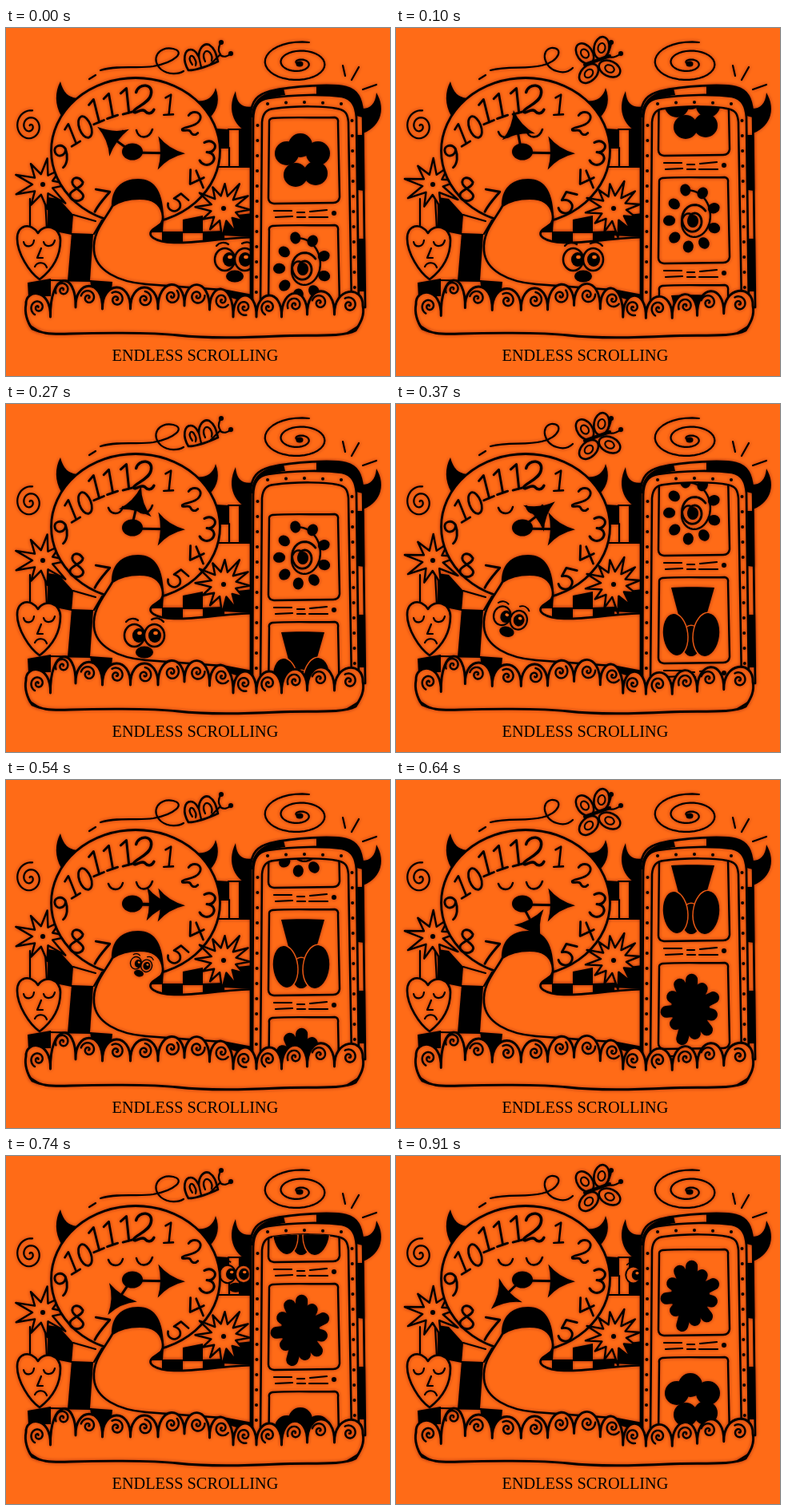
Recreate the animation shown at these times as an HTML page with a canvas. Size 480 by 436 pixels, loop 1.01 s.

```html
<!DOCTYPE html>
<html lang="en">
<head>
<meta charset="utf-8">
<title>Endless Scrolling</title>
<style>
  html, body { margin: 0; width: 100%; height: 100%; overflow: hidden; background: #ff6b17; }
  canvas { display: block; position: absolute; left: 0; top: 0; }
  p {
    position: absolute; left: 132.5px; top: 399px; margin: 0; white-space: nowrap;
    font: 20.3px/23px "Liberation Serif", "Times New Roman", serif; color: #000;
  }
</style>
</head>
<body>
<canvas width="480" height="436"></canvas>
<p>ENDLESS SCROLLING</p>
<script>
const PAPER = '#ff6b17', INK = '#000', TAU = Math.PI * 2;
const c = document.querySelector('canvas').getContext('2d');
c.lineCap = c.lineJoin = 'round';
c.shadowColor = 'rgba(130,30,0,.65)';

// start ms, minute hand degrees, feed scroll, face [x, y, scale, turn]
const LOOP = 1010;
const POSES = [
  { at: 0,   hand: -144, scroll: 0,   face: [286, 290, 1, 0] },
  { at: 100, hand: -101, scroll: 60,  face: [234, 290, 1, 0] },
  { at: 270, hand: -77,  scroll: 109, face: [173, 290, 1, 0] },
  { at: 370, hand: -38,  scroll: 165, face: [143, 268, .85, 15] },
  { at: 540, hand: 1,    scroll: 220, face: [169, 231, .55, 15] },
  { at: 640, hand: 62,   scroll: 288, face: null },
  { at: 740, hand: 124,  scroll: 357, face: [287, 148, .8, 0] },
  { at: 910, hand: 136,  scroll: 400, face: [306, 149, .75, 0] }
];

const asPath = p => typeof p === 'string' ? new Path2D(p) : p;

// ink multiplies, so its soft edge never lightens black
function useInk() {
  c.globalCompositeOperation = 'multiply';
  c.shadowBlur = 4;
  c.fillStyle = c.strokeStyle = INK;
}
function usePaper() {
  c.globalCompositeOperation = 'source-over';
  c.shadowBlur = 0;
  c.fillStyle = c.strokeStyle = PAPER;
}
function line(p, w = 2.7) {
  useInk();
  c.lineWidth = w;
  c.stroke(asPath(p));
}
function fill(p) {
  useInk();
  c.fill(asPath(p));
}
function clear(p, edge = 0) {
  usePaper();
  c.fill(asPath(p));
  if (!edge) return;
  c.lineWidth = edge;
  c.stroke(asPath(p));
}
function shape(p, w) {
  p = asPath(p);
  clear(p);
  line(p, w);
}
function oval(x, y, rx, ry = rx, turn = 0) {
  const p = new Path2D();
  p.ellipse(x, y, rx, ry, turn, 0, TAU);
  return p;
}
const dot = (x, y, rx, ry, turn) => fill(oval(x, y, rx, ry, turn));

function at(x, y, deg, scale, draw) {
  c.save();
  c.translate(x, y);
  c.rotate(deg * Math.PI / 180);
  c.scale(scale, scale);
  draw();
  c.restore();
}

function spiral(x, y, rx, ry, turns, start = 0, w = 2.4) {
  const p = new Path2D();
  for (let i = 0; i <= 80; i++) {
    const k = 1 - i / 84, a = start + i / 80 * turns * TAU;
    p.lineTo(x + rx * k * Math.cos(a), y + ry * k * Math.sin(a));
  }
  line(p, w);
}

function star(x, y, n, outer, inner, turn) {
  const p = new Path2D();
  for (let i = 0; i < n * 2; i++) {
    const r = i % 2 ? inner : outer + 4 * Math.sin(i * 2.3);
    const a = turn + i * Math.PI / n;
    p.lineTo(x + r * Math.cos(a), y + r * Math.sin(a));
  }
  p.closePath();
  shape(p, 2.4);
  dot(x, y, 3);
}

function drawSky(alt) {
  line('M104 64L112 59', 2.2);
  line(alt
    ? 'M118 53C140 47 162 52 182 47C205 42 210 24 194 25C180 28 185 50 201 54C210 57 217 54 221 50'
    : 'M118 53C140 46 165 51 184 48C211 43 225 30 209 26C190 22 180 40 194 52C203 59 216 58 222 54', 2.2);
  spiral(366, 44, 48, 27, -2.3, -1.3, 2.2);
  dot(367, 45, 4.5, 3.5);
  spiral(30, 123, 18, 20, -2.1, -1.4, 2.2);
  line('M421 47L424 60M441 49L432 65M463 71L446 77', 2.2);
  if (alt) {
    for (const [x, y, deg] of [[236, 32, 55], [257, 25, 100], [241, 57, -45], [267, 51, 25]])
      at(x, y, deg, 1, () => { shape(oval(0, 0, 14, 9.5), 2.5); line(oval(0, 0, 6, 4.5), 2); });
    line('M236 46L267 35', 4);
    line('M263 36C266 30 268 26 269 19M265 36C271 38 276 36 281 32', 2.2);
  } else {
    shape('M228 53C220 40 223 27 231 27C237 27 239 33 241 36C241 26 247 18 254 21C262 26 263 35 265 42C253 47 240 53 228 53Z', 2.6);
    line('M241 36L244 49M233 46C226 37 232 30 236 39C238 42 238 44 237 47M249 42C244 32 250 25 255 31C258 35 258 38 257 41', 2.2);
    line('M256 45L268 33C265 29 265 25 268 19M268 34C272 37 277 36 281 32', 2.2);
  }
  dot(269, 18, 3);
  dot(281, 32, 3);
}

function drawChecks() {
  fill('M52 212L66 214 84 234 82 259 52 253Z');
  fill('M82 257L109 258 105 316 77 317Z');
  fill('M105 316L133 318 130 348 110 348Z');
  fill('M27 319L56 314 56 336 28 336Z');
  line('M30 214V250M49 215L51 251M84 234L112 242M55 316L106 317M110 258L120 241', 2.2);
  fill('M262 126L279 127 279 151 265 151Z');
  fill('M291 128L307 128 307 173 291 173Z');
  line('M278 127H307M279 150V174M264 174H307', 2.2);
  fill('M180 240L197 238 196 256 180 256Z');
  fill('M195 255L221 255 221 270 195 270Z');
  fill('M221 240L246 235 246 256 221 256Z');
  fill('M246 255L273 254 273 268 246 268Z');
  fill('M273 236L308 232 308 262 273 260Z');
  line('M196 256H307', 2.2);
  fill('M262 316L308 318 308 346 275 336Z');
}

const GLYPHS = {
  0: 'M0-14C-10-13-10 13 0 14 10 13 9-13 0-14',
  1: 'M-6-9L1-14 1 14M-6 15L7 13',
  2: 'M-8-7C-6-17 9-17 7-6 6 3-8 8-9 12-8 16-2 8 2 11 5 14 9 14 11 9',
  3: 'M-7-11C0-17 9-12 5-5 3-1-1-1-2-1 6-2 10 4 6 10 2 15-5 14-8 10',
  4: 'M-1-13L-9 3 10 3M5-9L4 14',
  5: 'M8-13L-5-12-7-1C2-6 9 0 7 7 5 14-4 15-8 9',
  7: 'M-8-11L8-12C3-2-1 5-3 14',
  8: 'M6-9C0-17-9-13-6-6-3 0 8 2 8 8 7 16-8 16-8 7-7 1 7-3 6-9',
  9: 'M6-7C3-15-8-14-7-6-6 2 5 1 6-7 7 2 4 11-2 14'
};

// digit, x, y, degrees, scale
const DIAL = [
  [1, 151, 91, -6, 1.1], [2, 172, 90, 4, 1.25], [1, 204, 96, 6, .9], [2, 233, 119, 22, 1],
  [3, 253, 157, 12, 1.1], [4, 237, 189, -25, 1], [7, 118, 216, 14, 1.1],
  [8, 89, 202, 5, 1.05], [9, 70, 160, -14, 1.05], [1, 82, 133, -22, .95], [0, 99, 124, -20, 1],
  [1, 112, 104, -14, 1.05], [1, 130, 97, -10, 1.05]
];

const arrow = length => {
  line(`M0 0H${length - 26}`, 3);
  fill(`M${length - 34}-21Q${length - 21}-5 ${length} 0Q${length - 21} 5 ${length - 34} 21Q${length - 28} 0 ${length - 34}-21Z`);
};

function drawClock(hand, alt) {
  fill('M68 67C72 82 78 86 88 88L69 110C61 96 61 80 68 67Z');
  fill('M262 75C259 88 249 93 236 91L254 113C266 102 267 88 262 75Z');
  shape(oval(162, 154, 105.5, 91.5), 2.8);
  for (const [digit, x, y, deg, size] of DIAL)
    at(x, y, deg, size, () => line(GLYPHS[digit]));
  at(214, 219, alt ? 18 : 45, alt ? 1.05 : .95, () => line(GLYPHS[5]));
  line('M128 130C131 139 143 140 146 129M163 128C166 140 179 139 183 127', 2.4);
  at(157, 156, 1, 1, () => arrow(67));
  at(157, 155, hand, 1, () => arrow(53));
  dot(158, 155, 13, 10.5);
}

function drawTongue() {
  fill('M132 224C131 201 145 189 165 189C187 189 197 206 197 242L180 250Z');
  shape('M133 223C123 241 108 256 110 279C112 304 140 318 175 321L270 328 312 336V262C270 263 236 270 210 269C186 268 174 260 184 252C193 246 197 244 196 236C195 224 187 215 173 214C156 213 143 216 133 223Z', 2.6);
}

function drawFace([x, y, size, deg]) {
  at(x, y, deg, size, () => {
    for (const s of [-1, 1]) {
      shape(oval(s * 12.5, 0, 12.5, 14), 2.5);
      dot(s * 10 + 3, 0, 8, 9);
      clear(oval(s * 10 + 4, -3, 2.8, 2.2));
    }
    dot(0, 21, 11, 7.5);
    line('M-23-17C-19-22-12-22-8-19M9-20C14-23 20-22 24-17', 2.2);
  });
}

const PICTURES = [
  function flower() {
    for (const [x, y] of [[-20, -9], [-3, -19], [19, -9], [16, 16], [-9, 18]]) dot(x, y, 15);
  },
  function beads() {
    spiral(-2, -1, 31, 38, 1.2, -1.9);
    spiral(1, 0, 18, 21, -1.9, -.6, 2.8);
    dot(0, 1, 7, 8);
    for (let i = 0; i < 9; i++) {
      const a = -1.8 + i * .7, r = 1 - i * .02;
      dot(-2 + 32 * r * Math.cos(a), -1 + 38 * r * Math.sin(a), 7.5, 6.5, a);
    }
  },
  function tulip() {
    fill('M-27-41C-12-42 10-42 27-41L13 8H-14Z');
    for (const [x, y, rx, ry, turn] of [[-2, 26, 12, 19, 0], [-22, 18, 15, 26, -.12], [17, 18, 16, 27, .12]]) {
      const petal = oval(x, y, rx, ry, turn);
      clear(petal, 3);
      fill(petal);
    }
  },
  function splash() {
    for (let i = 0; i < 11; i++) {
      const a = i * TAU / 11 + .2, r = 1 + .14 * Math.sin(i * 2.7);
      line(`M-3 4L${-3 + 27 * r * Math.cos(a)} ${4 + 35 * r * Math.sin(a)}`, 15);
    }
    dot(-3, 4, 24, 31);
  }
];

function drawCard(y, kind) {
  line(`M333 ${y + 1}C360 ${y - 1} 390 ${y + 1} 411 ${y}Q416 ${y + 1} 415 ${y + 7}L417 ${y + 100}Q416 ${y + 107} 409 ${y + 107}L335 ${y + 108}Q328 ${y + 107} 328 ${y + 101}L329 ${y + 7}Q328 ${y + 2} 333 ${y + 1}Z`, 2.4);
  at(371, y + 54, 0, 1, PICTURES[kind]);
  line(`M335 ${y + 117}H357M337 ${y + 125}L358 ${y + 124}M364 ${y + 119}H373M364 ${y + 125}H374M380 ${y + 118}L401 ${y + 116}M379 ${y + 125}H402`, 2.2);
  dot(410, y + 120, 3);
}

function drawPhone(scroll) {
  fill('M287 79C288 96 297 101 311 98L308 133C286 126 275 104 287 79Z');
  fill('M463 81C462 96 454 102 443 101L443 133C467 126 476 103 463 81Z');
  shape('M306 350V110C306 91 315 83 330 79C360 72 410 70 425 74C440 78 444 88 446 105L449 350Z', 2.7);
  fill('M307 112C307 92 318 80 347 76L349 84C326 87 314 92 309 112Z');
  fill('M388 73C410 71 425 73 433 78C442 83 446 95 446 112L438 110C436 95 431 89 420 86L388 83Z');
  fill('M439 134L447 134 448 204 440 203Z');
  fill('M440 264L448 264 449 330 441 330Z');
  shape('M308 350L309 115C309 98 315 90 328 88C360 83 400 83 420 86C433 89 437 98 438 112L441 350Z', 2.7);
  for (let i = 0; i < 12; i++) {
    dot(314.5 - i * .15, 122 + i * 19, 2);
    dot(432.5 + i * .3, 116 + i * 19, 2);
  }
  for (let i = 0; i < 5; i++) dot(327 + i * 23, 95 - Math.sin(i * .8) * 2, 2);
  const screen = new Path2D('M318 350L320 118C321 106 326 102 335 101C365 97 400 98 414 101C425 103 427 108 428 118L432 350Z');
  shape(screen, 2.5);
  c.save();
  c.clip(screen);
  for (let i = 0; i < 7; i++) {
    const y = 112 + 135 * i - scroll;
    if (y > 20 && y < 360) drawCard(y, i % 4);
  }
  c.restore();
}

function drawHeart() {
  shape('M42 315C29 306 14 282 14 264C14 246 31 243 40 257C49 243 68 250 68 266C68 289 55 305 42 315Z', 2.6);
  line('M22 268C24 276 34 275 35 266M47 268C49 275 59 275 61 266M44 276L39 288 46 288M36 299C39 293 48 292 51 300', 2.2);
}

const HEDGE = [
  [40, 350], [71, 328], [103, 338], [138, 340], [173, 340], [207, 336], [239, 336],
  [270, 341], [298, 350], [328, 350], [361, 347], [392, 344], [429, 347]
];

function drawHedge(alt) {
  const pts = HEDGE.map(([x, y], i) => alt ? [x + 1.5 * Math.sin(i * 2 + 1), y - 1.5 * Math.cos(i)] : [x, y]);
  let d = 'M33 377C26 368 23 356 25 346';
  pts.forEach(([x, y], i) => {
    const next = pts[i + 1], left = i ? (pts[i - 1][0] + x) / 2 : 25;
    const right = next ? (x + next[0]) / 2 : 446;
    const low = next ? Math.max(y, next[1]) + 12 : 348;
    d += `C${left - 1} ${y - 23} ${right + 1} ${y - 25} ${right} ${low}`;
  });
  d += 'C449 362 441 372 437 379C420 388 380 384 340 386S250 389 215 385S110 382 80 383S45 382 33 377Z';
  shape(d, 2.9);
  line('M30 373L41 380M427 382L440 374', 2.5);
  pts.forEach(([x, y], i) => spiral(x, y, 9.5, 10, 1.6, i * .7 + 2));
}

function draw(pose, alt) {
  usePaper();
  c.fillRect(0, 0, 480, 436);
  const behind = pose.face && pose.at > 700;
  drawSky(alt);
  drawChecks();
  if (behind) drawFace(pose.face);
  star(46, 196, 9, 33, 13, alt ? -1.55 : -1.4);
  drawClock(pose.hand, alt);
  drawTongue();
  if (pose.face && !behind) drawFace(pose.face);
  star(272, 226, 12, 33, 16, alt ? -.15 : .05);
  drawPhone(pose.scroll);
  drawHeart();
  drawHedge(alt);
}

let shown = -1;
function tick() {
  const t = performance.now() % LOOP;
  const i = POSES.findLastIndex(p => p.at <= t);
  if (i !== shown) draw(POSES[shown = i], i % 2 === 1);
  requestAnimationFrame(tick);
}
tick();
</script>
</body>
</html>
```
